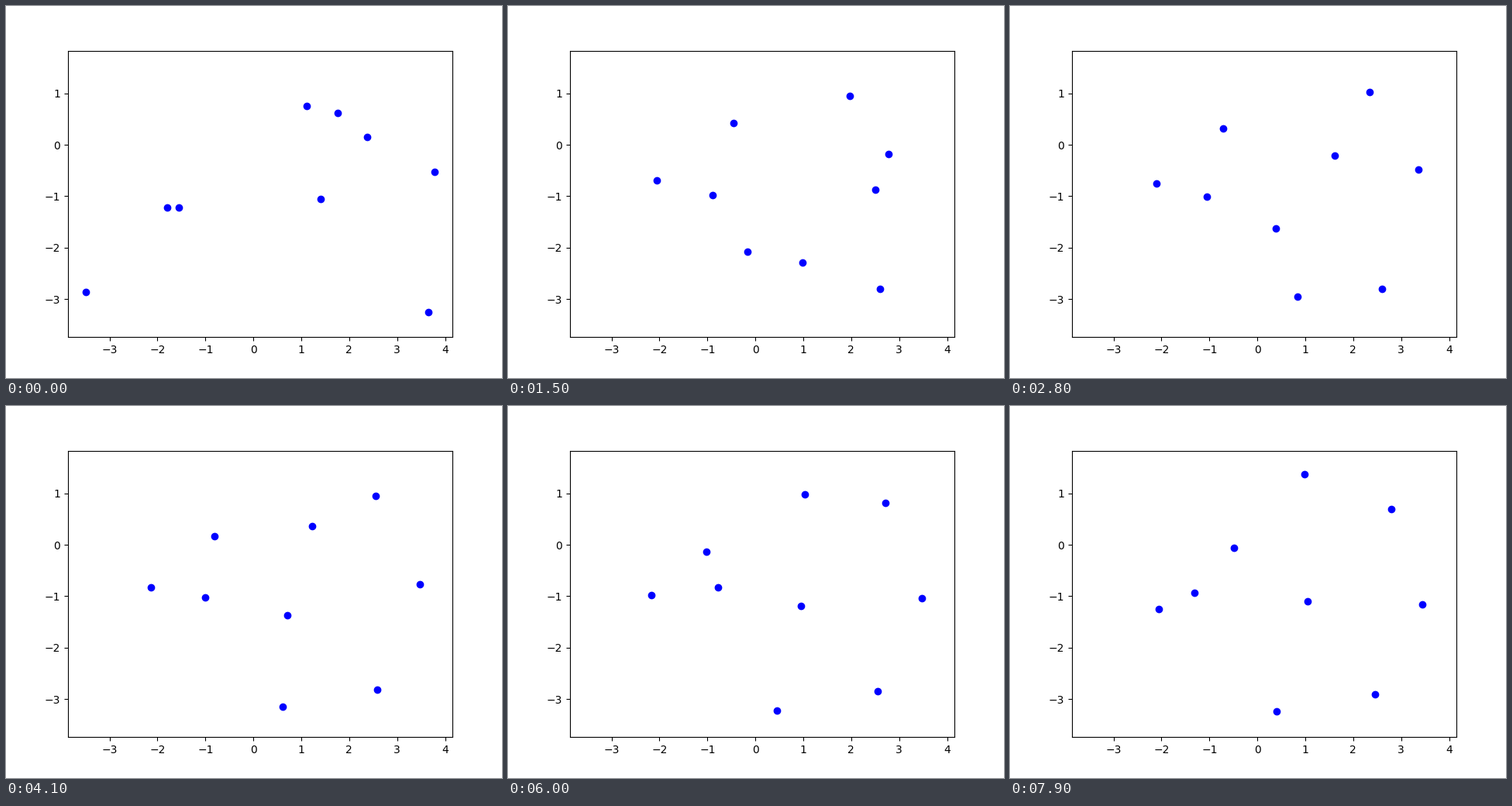
A matplotlib script for the animation above (8000 ms loop, 640 px wide and 480 px high).

```python
import numpy as np
import matplotlib.pyplot as plt
from matplotlib.animation import FuncAnimation

STEPS, INTERVAL = 80, 100
SETTLED, LAST = 15, STEPS - 1  # steps between which the layout drifts
RUSH = 0.25                    # decay per step of the opening rush

# Stage position of the data origin and size of one unit, in pixels
ORIGIN = np.array([319.15, 179.1])
UNIT = np.array([61.86, -66.3])

# Start, settled and last position in pixels, then rate and bend of the drift.
# A positive rate eases out, a negative one eases in.
MOVES = np.array([
    (428, 138, 441, 116, 492, 133, 0.03, 0.23),
    (466, 169, 491, 191, 532, 256, 0.045, 0.26),
    (553, 214, 474, 237, 380, 88, 0.03, 0.14),
    (406, 249, 380, 331, 344, 394, 0.067, 0.2),
    (208, 260, 192, 225, 192, 262, -0.025, -0.2),
    (103, 369, 309, 317, 384, 252, 0.043, 0),
    (545, 395, 480, 365, 471, 372, -0.05, 0),
    # a pair that turns about its centre: the centre, then half its span
    (305.5, 194.5, 277.5, 197.5, 263.5, 212, 0.07, -0.33),
    (-82.5, 65.5, -13.5, 46.5, 25.5, -29, -0.05, -0.1),
])
START, REST, END = MOVES[:, 0:2], MOVES[:, 2:4], MOVES[:, 4:6]
RATE, BEND = MOVES[:, 6:7], MOVES[:, 7:8]

CHORD = END - REST
BULGE = 4 * BEND * CHORD[:, ::-1] * (1, -1)
REACH = 1 - np.exp(-RATE * (LAST - SETTLED))
VELOCITY = RATE / REACH * (CHORD + BULGE)  # at the settled moment


def rush(step):
    """Decay from the scattered start onto the line of the drift."""
    line = REST + VELOCITY * (step - SETTLED)
    offset = START - (REST - VELOCITY * SETTLED)
    floor = np.exp(-RUSH * SETTLED)
    return line + offset * (np.exp(-RUSH * step) - floor) / (1 - floor)


def drift(step):
    """Exponential easing along a bowed path."""
    s = (1 - np.exp(-RATE * (step - SETTLED))) / REACH
    return REST + CHORD * s + BULGE * s * (1 - s)


def nodes(step):
    pos = rush(step) if step < SETTLED else drift(step)
    *single, centre, half = pos
    px = np.array([*single, centre - half, centre + half])
    return ((px - ORIGIN) / UNIT).T


fig, ax = plt.subplots(figsize=(6.4, 4.8), dpi=100)
dots, = ax.plot(*nodes(0), "bo")
ax.set_xlim((np.array([80, 576]) - ORIGIN[0]) / UNIT[0])
ax.set_ylim((np.array([427.2, 57.6]) - ORIGIN[1]) / UNIT[1])
ax.set_xticks(range(-3, 5))
ax.set_yticks(range(-3, 2))


def update(step):
    dots.set_data(*nodes(step))
    return dots,


anim = FuncAnimation(fig, update, frames=STEPS, interval=INTERVAL,
                     repeat=True, repeat_delay=0)
plt.show()
```
